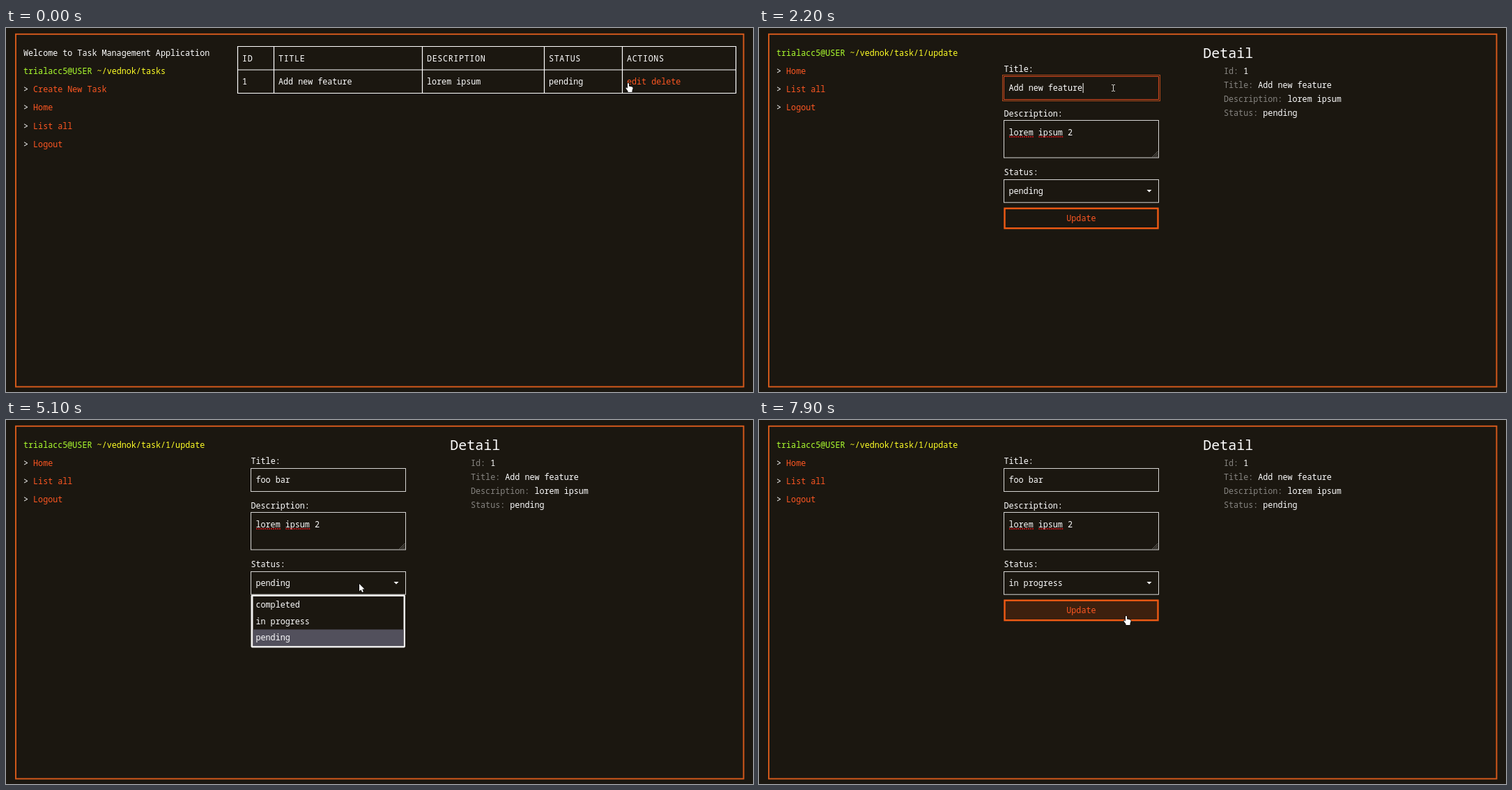
Animation of 1072x522 px, one loop 8000 ms. Source, as an HTML page with a canvas:

```html
<!DOCTYPE html>
<html lang="en">
<head>
<meta charset="utf-8">
<title>Task management</title>
<style>
  html, body { margin: 0; width: 100%; height: 100%; overflow: hidden; background: #1b1710; }
  canvas { display: block; }
</style>
</head>
<body>
<canvas id="stage" width="1072" height="522"></canvas>
<script>
const ctx = document.getElementById('stage').getContext('2d');
const LOOP = 8000, STEP = 100, CHAR = 7.04, FONT_SIZE = 11.73;
const BG = '#1b1710', WHITE = '#fff', LINK = '#ff5722', FRAME = '#d95b1c';
const BUTTON = '#ee5a14', GREY = '#868480', BORDER = '#d6d5d3';

// Moments at which the interface changes
const OPEN_FORM = 400, FOCUS_DESC = 1000, TYPE_DESC = 1500, FOCUS_TITLE = 2100;
const ERASE = 2400, TYPE_TITLE = 3100, OPEN_LIST = 5000, CLOSE_LIST = 6000;
const OLD_TITLE = 'Add new feature', NEW_TITLE = 'foo bar';

// Pointer path: time, x, y
const PATH = [
  [0, 893, 79], [400, 893, 79], [900, 448, 160], [1800, 448, 160],
  [2100, 508, 86], [4400, 508, 86], [4900, 507, 235], [5200, 507, 235],
  [5500, 507, 289], [6000, 507, 289], [6700, 749, 137], [6900, 749, 137],
  [7300, 527, 281], [8000, 527, 281]
];

const clamp = (v, lo, hi) => Math.max(lo, Math.min(hi, v));
const inside = (p, x, y, w, h) => p.x >= x && p.x <= x + w && p.y >= y && p.y <= y + h;

function text(str, x, y, color = WHITE, size = FONT_SIZE, spacing = 0) {
  ctx.font = `${size}px "Noto Sans Mono", monospace`;
  ctx.letterSpacing = spacing + 'px';
  ctx.fillStyle = color;
  ctx.fillText(str, x, y);
}

function box(x, y, w, h, color, width = 1) {
  ctx.strokeStyle = color;
  ctx.lineWidth = width;
  ctx.strokeRect(x, y, w, h);
}

function line(x1, y1, x2, y2, color, width = 1) {
  ctx.strokeStyle = color;
  ctx.lineWidth = width;
  ctx.beginPath();
  ctx.moveTo(x1, y1);
  ctx.lineTo(x2, y2);
  ctx.stroke();
}

function prompt(path, y) {
  text('trialacc5@USER', 25, y, '#adff2f');
  text(path, 25 + 15 * CHAR, y, '#ffff26');
}

function menu(items, y) {
  items.forEach((item, i) => {
    text('>', 25, y + i * 26.15);
    text(item, 25 + 2 * CHAR, y + i * 26.15, LINK);
  });
}

function listPage() {
  text('Welcome to Task Management Application', 25, 40);
  prompt('~/vednok/tasks', 66);
  menu(['Create New Task', 'Home', 'List all', 'Logout'], 92.2);

  const columns = [332.5, 384.5, 597.5, 772.5, 884.5, 1047.5];
  columns.forEach(x => line(x, 26, x, 94, WHITE, 1.2));
  [26.5, 60, 93.5].forEach(y => line(332, y, 1048, y, WHITE, 1.2));
  ['ID', 'TITLE', 'DESCRIPTION', 'STATUS', 'ACTIONS'].forEach((s, i) =>
    text(s, columns[i] + 6.5, 47.5, WHITE, FONT_SIZE, 0.64));
  ['1', OLD_TITLE, 'lorem ipsum', 'pending', 'edit delete'].forEach((s, i) =>
    text(s, columns[i] + 6.5, 81, i === 4 ? LINK : WHITE));
}

function field(y, h, focused) {
  box(351.5, y, 222, h, focused ? '#d9481f' : BORDER);
  if (focused) box(349.5, y - 2, 226, h + 4, '#b34a1b');
}

function caret(chars, y, since) {
  if (since % 1000 < 500) line(359.5 + chars * CHAR, y - 11, 359.5 + chars * CHAR, y + 3, WHITE);
}

function squiggle(x) {
  ctx.setLineDash([2, 1]);
  line(x, 156, x + 5 * CHAR, 156, '#e3161b', 1.3);
  ctx.setLineDash([]);
}

function titleAt(t) {
  if (t < TYPE_TITLE) {
    const erased = t < ERASE ? 0 : Math.ceil((t - ERASE + STEP) / 40);
    return OLD_TITLE.slice(0, Math.max(0, OLD_TITLE.length - erased));
  }
  return NEW_TITLE.slice(0, (t - TYPE_TITLE) / STEP + 1);
}

function dropdown(p) {
  ctx.fillStyle = '#f2f1ef';
  ctx.beginPath();
  ctx.roundRect(351.5, 250.5, 221.5, 76, 2);
  ctx.fill();
  ctx.fillStyle = BG;
  ctx.fillRect(354.5, 253, 216, 71);
  const active = p.y < 253 ? 2 : clamp(Math.floor((p.y - 253) / 23.7), 0, 2);
  ctx.fillStyle = '#52505c';
  ctx.fillRect(354.5, 253 + active * 23.7, 216, 23.7);
  ['completed', 'in progress', 'pending'].forEach((s, i) => text(s, 358.5, 269 + i * 23.7));
}

function formPage(t, p) {
  const open = t >= OPEN_LIST && t < CLOSE_LIST;
  const onDesc = t >= FOCUS_DESC && t < FOCUS_TITLE;
  const onTitle = t >= FOCUS_TITLE && t < OPEN_LIST;
  prompt('~/vednok/task/1/update', 40);
  menu(['Home', 'List all', 'Logout'], 66);

  const title = titleAt(t);
  text('Title:', 351.5, 63);
  field(69.5, 33, onTitle);
  text(title, 358.5, 90.3);
  if (onTitle) {
    const lastKey = t < ERASE ? FOCUS_TITLE : Math.min(t, TYPE_TITLE + 6 * STEP);
    caret(title.length, 90, t - lastKey);
  }

  const typed = t < TYPE_DESC ? 0 : t < TYPE_DESC + STEP ? 1 : 2;
  const desc = 'lorem ipsum' + ' 2'.slice(0, typed);
  text('Description:', 351.5, 127);
  field(132.5, 53.5, onDesc);
  text(desc, 358.5, 154);
  squiggle(359);
  squiggle(359 + 6 * CHAR);
  [8, 5, 2].forEach(d => line(572.5 - d, 185, 572.5, 185 - d, '#8b8985', 0.8));
  if (onDesc) caret(desc.length, 154, t - (typed ? TYPE_DESC + STEP : FOCUS_DESC));

  text('Status:', 351.5, 211);
  field(217.5, 32.7, false);
  text(t < CLOSE_LIST ? 'pending' : 'in progress', 358.5, 238);
  ctx.fillStyle = WHITE;
  ctx.beginPath();
  ctx.moveTo(556.5, 232);
  ctx.lineTo(563.5, 232);
  ctx.lineTo(560, 235.5);
  ctx.fill();

  if (open) {
    dropdown(p);
  } else {
    if (overButton(p)) {
      ctx.fillStyle = '#3d200e';
      ctx.fillRect(352, 258, 221, 30);
    }
    box(352.5, 258.7, 220, 28.5, BUTTON, 2.4);
    text('Update', 441.3, 277, LINK);
  }

  text('Detail', 637.3, 43, WHITE, 20);
  [['Id:', '1'], ['Title:', OLD_TITLE], ['Description:', 'lorem ipsum'], ['Status:', 'pending']]
    .forEach(([label, value], i) => {
      const y = 66 + i * 19.9;
      text(label, 667, y, GREY);
      text(value, 667 + (label.length + 1) * CHAR, y);
    });
}

const overButton = p => inside(p, 352, 258, 221, 30);

function pointerAt(t) {
  const i = PATH.findIndex(k => k[0] > t);
  const [t0, x0, y0] = PATH[i - 1], [t1, x1, y1] = PATH[i];
  const u = (t - t0) / (t1 - t0), s = u * u * (3 - 2 * u);
  return { x: x0 + (x1 - x0) * s, y: y0 + (y1 - y0) * s };
}

const SHAPES = {
  arrow: new Path2D('M0 0V10.5L2.4 8.3L4.1 12L5.9 11.2L4.3 7.6H7.5Z'),
  hand: new Path2D('M-1 1Q-1 0 0 0Q1 0 1 1V4.5L5.5 5.5Q6.7 6 6.6 7.5L5.5 11V13H-0.5V11.5L-3.5 7.5Q-3.6 6 -2.2 6.5L-1 7.7Z'),
  beam: new Path2D('M-2.5 -4.5H-0.7L0 -4L0.7 -4.5H2.5M0 -4V4M-2.5 4.5H-0.7L0 4L0.7 4.5H2.5')
};

function drawPointer(t, p) {
  if ((t >= TYPE_DESC && t < 1800) || (t >= ERASE && t < 4400)) return;
  const onField = inside(p, 352, 69, 221, 33) || inside(p, 352, 132, 221, 54);
  const open = t >= OPEN_LIST && t < CLOSE_LIST;
  const kind = t < OPEN_FORM || (overButton(p) && !open) ? 'hand' : onField ? 'beam' : 'arrow';
  ctx.save();
  ctx.translate(Math.round(p.x), Math.round(p.y));
  if (kind === 'beam') {
    ctx.translate(0.5, 0);
    ctx.strokeStyle = '#d8d7d4';
    ctx.lineWidth = 1;
    ctx.stroke(SHAPES.beam);
  } else {
    ctx.strokeStyle = '#0b0a08';
    ctx.lineWidth = 1.4;
    ctx.stroke(SHAPES[kind]);
    ctx.fillStyle = WHITE;
    ctx.fill(SHAPES[kind]);
  }
  ctx.restore();
}

function draw(now) {
  const t = Math.floor((now % LOOP) / STEP) * STEP;
  const pointer = pointerAt(t);
  ctx.fillStyle = BG;
  ctx.fillRect(0, 0, 1072, 522);
  box(14, 8.8, 1044.5, 505.7, FRAME, 1.9);
  if (t < OPEN_FORM) listPage();
  else formPage(t, pointer);
  drawPointer(t, pointer);
  requestAnimationFrame(draw);
}

requestAnimationFrame(draw);
</script>
</body>
</html>
```
